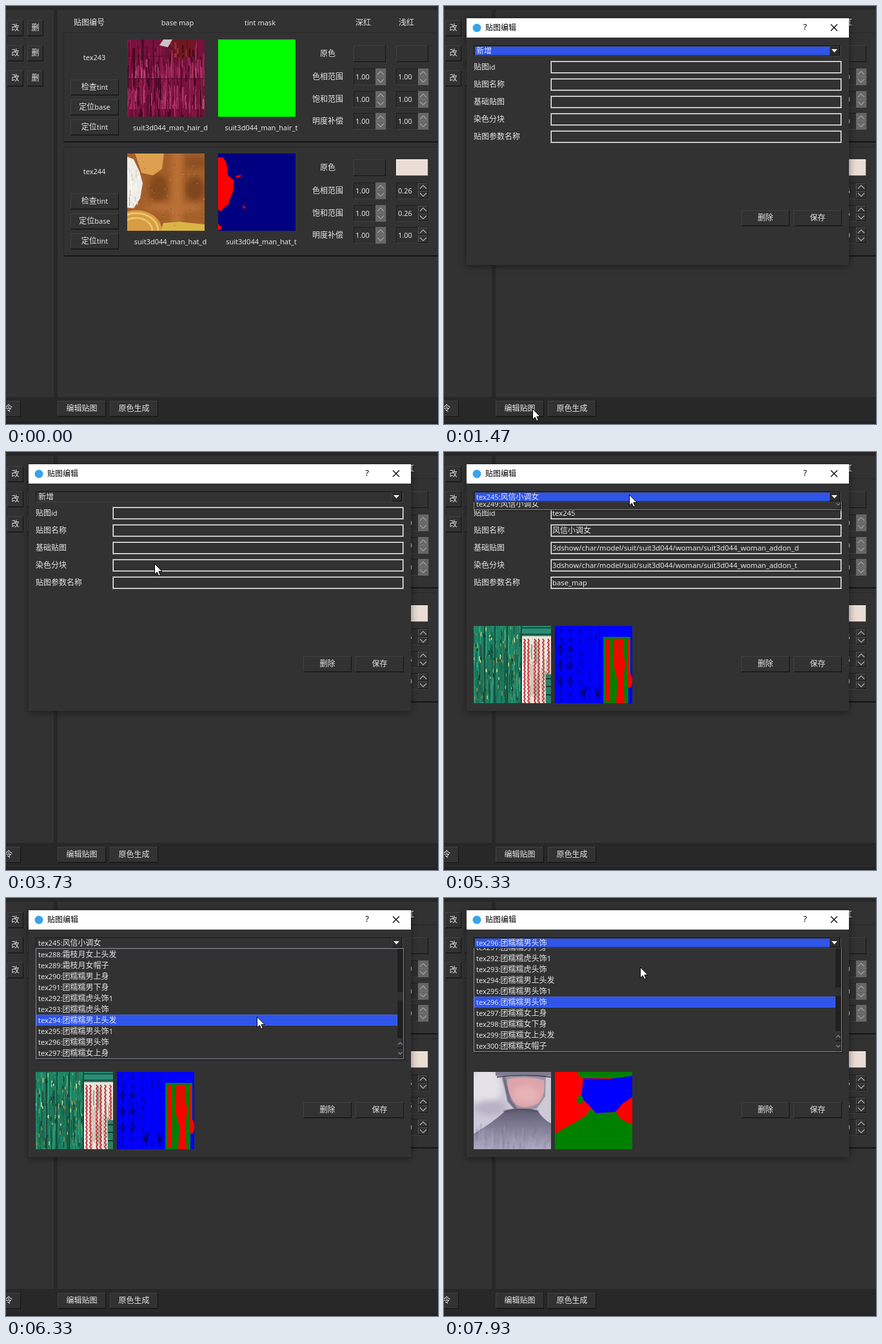
Recreate the animation shown at these times as an HTML page. Size 670x649 px, loop 8000 ms.

```html
<!DOCTYPE html>
<html lang="zh-CN">
<head>
<meta charset="utf-8">
<title>贴图编辑</title>
<style>
html, body { margin: 0; width: 100%; height: 100%; overflow: hidden; background: #282828; }
svg { display: block; }
#stage { position: absolute; left: 0; top: 0; }
text { font-family: "Noto Sans", "Noto Sans CJK SC", "Noto Sans CJK", sans-serif; white-space: pre; }
rect { shape-rendering: crispEdges; }
#dialog { transform-origin: 331px 210px; }
#frame { filter: drop-shadow(0 2px 6px rgba(0, 0, 0, .45)); }
</style>
</head>
<body>
<svg id="stage" width="670" height="649" viewBox="0 0 670 649">
  <defs>
    <clipPath id="below"><rect x="40" y="78" width="590" height="180"/></clipPath>
    <filter id="soft" x="-30%" y="-30%" width="160%" height="160%"><feGaussianBlur stdDeviation="4"/></filter>
    <filter id="slight"><feGaussianBlur stdDeviation="1"/></filter>
    <linearGradient id="fur" x2="0" y2="1"><stop stop-color="#5d596f"/><stop offset=".5" stop-color="#85819a"/><stop offset="1" stop-color="#aaa7bf"/></linearGradient>
  </defs>
  <g id="main"></g>
  <g id="dialog">
    <g id="chrome"></g>
    <g id="combo"></g>
    <g id="fields"></g>
    <g clip-path="url(#below)"><g id="popup"></g></g>
  </g>
  <path id="cursor" d="M0 0V16.5L3.8 13L6.3 18.8L8.8 17.7L6.4 12H11.6Z" fill="#fff" stroke="#000" stroke-width="1"/>
</svg>
<script>
const $ = id => document.getElementById(id);
const range = n => [...Array(n).keys()];
const LOOP = 8000, STEP = 1000 / 15;

let seed = 1;
const rnd = (a = 0, b = 1) => {
  seed = (seed * 16807) % 2147483647;
  return a + (b - a) * seed / 2147483647;
};
const pick = list => list[Math.floor(rnd(0, list.length))];

// ---- drawing helpers ----
const rect = (x, y, w, h, fill, extra = '') =>
  `<rect x="${x}" y="${y}" width="${w}" height="${h}" fill="${fill}" ${extra}/>`;
const shape = (d, fill, extra = '') => `<path d="${d}" fill="${fill}" ${extra}/>`;
const line = (d, stroke, width = 1, extra = '') =>
  `<path d="${d}" fill="none" stroke="${stroke}" stroke-width="${width}" ${extra}/>`;
const oval = (x, y, rx, ry, fill, extra = '') =>
  `<ellipse cx="${x}" cy="${y}" rx="${rx}" ry="${ry}" fill="${fill}" ${extra}/>`;

// y is the middle of the line; Latin runs are set slightly smaller than Han runs
function text(x, y, str, { anchor = 'start', fill = '#e6e6e6', latin = 11 } = {}) {
  const runs = str.match(/[\x00-\x7f]+|[^\x00-\x7f]+/g) || [];
  const spans = runs.map(r => `<tspan font-size="${r.charCodeAt(0) < 128 ? latin : 12}">${r}</tspan>`);
  return `<text x="${x}" y="${y + 4}" fill="${fill}" text-anchor="${anchor}">${spans.join('')}</text>`;
}
const centred = (x, y, str) => text(x, y, str, { anchor: 'middle' });

const bevel = (x, y, w, h, fill = '#323232', light = '#414141', dark = '#141414') =>
  rect(x, y, w, h, dark) + rect(x, y, w - 1, h - 1, light) + rect(x + 1, y + 1, w - 2, h - 2, fill);
const button = (x, y, w, label) =>
  bevel(x, y, w, 25) + rect(x + 1, y + 23, w - 2, 1, '#262626') + centred(x + w / 2, y + 12, label);

const chevron = (x, y, dir, color, size = 5) =>
  line(`M${x - size} ${y + dir * size / 2}L${x} ${y - dir * size / 2}L${x + size} ${y + dir * size / 2}`, color, 1.2);

function spin(x, y, value, enabled) {
  const parts = [bevel(x, y, 51, 26, '#2f2f2f', '#1e1e1e', '#404040'), text(x + 3, y + 13, value)];
  if (enabled) {
    parts.push(bevel(x + 34, y + 1, 16, 12, '#323232', '#555', '#161616'),
      bevel(x + 34, y + 13, 16, 12, '#323232', '#555', '#161616'));
  } else {
    parts.push(rect(x + 34, y, 16, 26, '#676767'), rect(x + 34, y + 12, 16, 1, '#747474'));
  }
  const color = enabled ? '#b5b5b5' : '#a2a2a2';
  parts.push(chevron(x + 42, y + 7, 1, color), chevron(x + 42, y + 19, -1, color));
  return parts.join('');
}

// ---- textures, each 120 x 120 ----
const tile = (x, y, body) => `<svg x="${x}" y="${y}" width="120" height="120">${body}</svg>`;

const strands = (n, colors, x0, x1, y0, y1, short, long, width = 1.5) => range(n).map(() => {
  const x = rnd(x0, x1), y = rnd(y0, y1), len = Math.min(rnd(short, long), y1 - y);
  return line(`M${x.toFixed(1)} ${y.toFixed(1)}q${rnd(-2, 2).toFixed(1)} ${(len / 2).toFixed(1)} 0 ${len.toFixed(1)}`,
    pick(colors), rnd(.5, width).toFixed(1));
}).join('');

// vertical zigzag
const zigzag = (x, y, n, dx, dy) => `M${x} ${y}` + range(n).map(i => `l${i % 2 ? -dx : dx} ${dy}`).join('');

function hair() {
  seed = 11;
  const deep = ['#4c0a27', '#8c1748', '#66102f', '#a0235a', '#360619'];
  const shine = ['#c94a80', '#b23468', '#a02a5c'];
  return rect(0, 0, 120, 120, '#76123b') + strands(190, deep, 0, 120, -10, 120, 18, 60, 3) +
    strands(80, shine, 0, 120, 30, 60, 10, 25) + strands(80, shine, 0, 120, 70, 108, 12, 32) +
    shape('M68 0H108L102 26L84 30L70 16Z', '#6f1821') + strands(16, ['#a33030', '#3f0c14'], 68, 104, 0, 28, 8, 18, 3) +
    shape('M56 0H70L63 12L50 9Z', '#c9c4c2') + line('M0 61H120M0 26H60', '#4c0a27', 2, 'opacity=".4"');
}

function hat() {
  seed = 5;
  const blur = 'filter="url(#soft)"';
  return rect(0, 0, 120, 120, '#a45f2b') +
    oval(48, 54, 15, 22, '#83481f', blur) + oval(105, 55, 15, 19, '#7f441e', blur) +
    oval(106, 14, 18, 10, '#8d4f22', blur) + oval(72, 84, 46, 7, '#b87034', blur) + rect(69, -10, 16, 125, '#ba7136', blur) +
    shape('M12 0H57L54 24L40 34L22 30Z', '#dca04e') +
    shape('M0 5L10 9L19 28L24 46L20 70L10 85L0 84Z', '#f0ece6') + strands(22, ['#bdb4aa', '#fff'], 0, 20, 10, 84, 5, 14) +
    oval(14, 120, 40, 32, '#d99c42') + [34, 25].map(r => line(`M${14 - r} 120A${r} ${r * .8} 0 0 1 ${14 + r} 120`, '#ecc56c', 3)).join('') +
    shape('M56 108L80 106L120 110V120H52Z', '#d9b545') +
    range(60).map(() => rect(rnd(25, 119).toFixed(0), rnd(2, 118).toFixed(0), 1, 1, pick(['#d9a25c', '#7d431c']))).join('');
}

const hatMask = () => rect(0, 0, 120, 120, '#000080') +
  shape('M0 6H8L13 15L15 34L25 42L23 60L18 71L16 79L9 84L4 90L0 87ZM27 35L36 33L34 37L28 37ZM37 79L43 84L40 86ZM0 109L6 115L3 119H0Z', '#f00');

function cloth() {
  seed = 23;
  return rect(0, 0, 120, 120, '#1f8463') +
    strands(150, ['#0f4c3d', '#2b9c76', '#146650', '#35a880', '#2a5a48', '#1b7458'], 0, 76, -10, 120, 12, 55, 2.4) +
    strands(90, ['#d8c46a', '#e9e2a4', '#b5883a', '#0b2e26'], 0, 74, 0, 120, 3, 8, 1.6) +
    line('M17 0V120M33 0V120M52 0V120M74 0V120', '#0e3f35', 1.5) +
    rect(75, 0, 45, 16, '#2a8e74') + line('M75 3H120M75 13H120', '#174e44', 2) +
    rect(75, 16, 45, 104, '#e9e5db') +
    strands(45, ['#b9aa98', '#98a88f', '#fff', '#c9b6a8'], 76, 119, 18, 120, 20, 60, 2.4) +
    [78, 84, 94, 100, 107, 115].map(x => line(zigzag(x, 20, 34, 2, 3), '#c22a35', 1.8)).join('') +
    rect(112, 75, 8, 45, '#2b8062') + line('M112 82H120M112 94H120M112 107H120', '#123f35', 2);
}

function clothMask() {
  seed = 31;
  const ticks = range(5).map(i => line(`M${9 + i * 15} 4V118`, '#000050', 1, `stroke-dasharray="${7 + i} ${5 + i % 3}"`)).join('');
  const crosses = range(6).map(i => {
    const x = 9 + i % 2 * 15, y = 36 + (i >> 1) * 25;
    return line(`M${x} ${y - 6}V${y + 6}M${x - 5} ${y}l5 -4 5 4 -5 4Z`, '#000050');
  }).join('');
  return rect(0, 0, 120, 120, '#00f') + ticks + crosses + strands(25, ['#000060', '#0000a0'], 2, 72, 5, 118, 4, 12, 1.2) +
    line('M41 95l4 16 4 -16M62 95l4 16 4 -16M45 92V115M66 92V115', '#000050', 1.5) +
    rect(75, 17, 42, 103, '#008000') + line(zigzag(81, 21, 32, 2, 3), '#f00', 5) +
    shape('M92 20H107L105 36L109 58L106 86L108 120H95L97 86L91 62Z', '#f00') +
    line('M100 24V56', '#008000', 1.5) + rect(112, 20, 4, 70, '#f00') + oval(116, 85, 4, 11, '#f00') + rect(114, 96, 6, 24, '#00f');
}

function furHead() {
  seed = 47;
  return rect(0, 0, 120, 120, '#cdc9d7') +
    oval(18, 24, 25, 30, '#e4e1e8', 'filter="url(#soft)"') + oval(26, 56, 25, 12, '#b8b3c6', 'filter="url(#soft)"') +
    shape('M46 8L112 6L111 38L98 57L66 60L52 46Z', '#9a94a4') + line('M46 8L56 45L66 58', '#6a6578', 4, 'filter="url(#slight)"') +
    shape('M52 11Q82 5 109 13Q112 34 101 48Q82 59 66 51Q52 36 52 11Z', '#dda4ab') +
    oval(82, 35, 20, 14, '#e6b3b5', 'filter="url(#soft)"') +
    rect(34, 0, 86, 6, '#817c8f') + line('M36 8Q80 3 120 8', '#4f4a5b', 2) +
    shape('M0 96Q28 80 50 60Q76 54 99 60Q108 74 120 80V120H0Z', 'url(#fur)') +
    `<g opacity=".45" filter="url(#slight)">${strands(70, ['#6f6b84', '#b8b5ca'], 4, 118, 80, 120, 10, 30, 2)}</g>` +
    line('M47 62Q75 54 100 62', '#544f63', 3, 'filter="url(#slight)"');
}

const furMask = () => rect(0, 0, 120, 120, '#f00') +
  shape('M36 0H120V6L102 10L45 9L37 7ZM0 96L10 90L30 79L48 68L55 57L64 64L94 62L102 73L120 82V120H0Z', '#008000') +
  shape('M44 10L85 11L120 6V39L105 49L94 62L64 64L53 52L41 40Z', '#00f') + oval(39, 43, 5, 6, '#008000');

// ---- main window ----
const lightSwatch = (x, y) => bevel(x, y, 50, 26, '#ebdcd5', '#fbf6f3', '#55504d');

function group(top, name, part, swatch, values) {
  const rows = ['色相范围', '饱和范围', '明度补偿'];
  return rect(89, top, 581, 171, '#272727') + rect(90, top + 1, 580, 169, '#323232') + rect(89, top + 169, 581, 2, '#151515') +
    centred(137, top + 39, name) +
    ['检查tint', '定位base', '定位tint'].map((s, i) => button(100, top + 73 + i * 31, 75, s)).join('') +
    centred(255, top + 148, `suit3d044_man_${part}_d`) + centred(396, top + 148, `suit3d044_man_${part}_t`) +
    centred(499, top + 33, '原色') + bevel(539, top + 20, 50, 26) + swatch(605, top + 20) +
    rows.map((s, i) => {
      const y = top + 56 + Math.round(i * 34.6);
      return centred(499, y + 13, s) + spin(539, y, '1.00', false) + spin(605, y, values ? values[i] : '1.00', !!values);
    }).join('');
}

$('main').innerHTML = rect(0, 0, 670, 649, '#282828') + rect(0, 6, 74, 601, '#323232') + rect(80, 6, 590, 601, '#323232') +
  rect(0, 645, 670, 4, '#222') +
  [22, 61, 100].map(y => button(2, y, 25, '改') + button(33, y, 25, '删')).join('') +
  text(105, 26, '贴图编号') + centred(266, 26, 'base map') + centred(394, 26, 'tint mask') +
  centred(554, 26, '深红') + centred(621, 26, '浅红') +
  group(41, 'tex243', 'hair', (x, y) => bevel(x, y, 50, 26)) + group(218, 'tex244', 'hat', lightSwatch, ['0.26', '0.26', '1.00']) +
  tile(188, 52, hair()) + tile(329, 52, rect(0, 0, 120, 120, '#0f0')) + tile(188, 229, hat()) + tile(329, 229, hatMask()) +
  bevel(-53, 613, 76, 25) + text(10, 625, '生成指令', { anchor: 'end' }) +
  button(80, 613, 75, '编辑贴图') + button(161, 613, 75, '原色生成');

// ---- dialog ----
const fieldY = i => 95 + i * 27;
const input = y => rect(165, y, 452, 20, '#8c8c8c') + bevel(166, y + 1, 450, 18, '#323232', '#f8f8f8', '#f8f8f8');

$('chrome').innerHTML = `<g id="frame">${rect(35, 19, 593, 383, '#323232')}</g>` + rect(35, 19, 593, 30, '#fff') +
  oval(51, 34, 6.5, 6.5, '#38a3ea') + text(64, 34, '贴图编辑', { fill: '#000' }) +
  text(560, 33, '?', { anchor: 'middle', fill: '#000', latin: 13 }) + line('M600 28.5L610 38.5M610 28.5L600 38.5', '#000', 1.2) +
  ['贴图id', '贴图名称', '基础贴图', '染色分块', '贴图参数名称'].map((s, i) =>
    text(46, fieldY(i), s) + input(fieldY(i) - 10)).join('') +
  button(461, 317, 75, '删除') + button(542, 317, 75, '保存');

// ---- list entries ----
const NEAR = ['男上身', '男下身', '虎头饰1', '虎头饰', '男上头发', '男头饰1', '男头饰', '女上身', '女下身', '女上头发', '女帽子'];
const PARTS = ['上身', '下身', '上头发', '帽子'];
function entryName(n) {
  if (n < 250) return '风信小调' + (n < 245 ? '男' : '女');
  if (n < 290) return '霜枝月' + ((n >> 2) % 2 ? '男' : '女') + PARTS[(n + 2) % 4];
  return '团糯糯' + NEAR[Math.min(n - 290, NEAR.length - 1)];
}
const entry = i => i ? `tex${240 + i}:${entryName(240 + i)}` : '新增';

const path = (suit, who, kind) => `3dshow/char/model/suit/${suit}/${who}/${suit}_${who}_addon_${kind}`;
function details(i, suit, who, base, mask) {
  const values = [`tex${240 + i}`, entryName(240 + i), path(suit, who, 'd'), path(suit, who, 't'), 'base_map'];
  return values.map((s, k) => text(168, fieldY(k), s, { latin: 11.3 })).join('') + tile(46, 270, base) + tile(172, 270, mask);
}
const DETAILS = {
  0: '',
  5: details(5, 'suit3d044', 'woman', cloth(), clothMask()),
  56: details(56, 'suit3d051', 'man', furHead(), furMask())
};

const BLUE = '#2f55ea';
const drawCombo = (selected, focus) => bevel(46, 61, 570, 17, '#323232', '#191919', '#444') +
  (focus ? rect(48, 63, 550, 13, BLUE) : '') + text(50, 70, entry(selected)) +
  bevel(598, 62, 16, 15, '#2c2c2c', '#3c3c3c', '#111') + shape('M601 67H610L605.5 72Z', '#fff');

const rowTop = row => 81 + row * 17 - 0;
const drawPopup = (first, row) => rect(48, 80, 571, 172, '#000', 'opacity=".3"') +
  bevel(46, 78, 571, 172, '#323232', '#858994', '#858994') +
  (row >= 0 && row < 10 ? rect(47, 79 + row * 17, 560, 17, BLUE) +
    rect(47.5, 79.5 + row * 17, 559, 16, 'none', 'stroke="#5a78ee" stroke-dasharray="1 1"') : '') +
  range(10).map(i => text(50, 88 + i * 17, entry(first + i))).join('') +
  rect(607, 79, 9, 170, '#202020') + rect(607, 79 + Math.round(first * 1.4), 9, 13, '#303030') +
  [218, 234].map(y => bevel(607, y, 9, 15, '#323232', '#3c3c3c', '#1a1a1a')).join('') +
  chevron(611.5, 226, 1, '#8a8a8a', 3) + chevron(611.5, 241, -1, '#8a8a8a', 3);

// ---- motion ----
const POINTER = [
  [130, 656, 556], [270, 520, 590], [400, 350, 624], [530, 225, 634], [670, 158, 629], [800, 137, 625], [1540, 137, 625],
  [1670, 143, 560], [1800, 165, 330], [1930, 189, 130], [2000, 195, 75], [2270, 204, 34], [2530, 220, 67], [3135, 220, 67],
  [3270, 223, 100], [3400, 229, 157], [3470, 230, 173], [4670, 230, 173], [4870, 243, 145], [5130, 277, 85], [5330, 287, 66],
  [5400, 293, 70], [5470, 318, 92], [5530, 350, 130], [5630, 387, 180], [6130, 389, 191], [6200, 389, 191],
  [6330, 389, 184], [6600, 388, 174], [7140, 388, 174], [7330, 365, 140], [7530, 320, 80], [7670, 304, 67], [7800, 304, 69], [7933, 304, 107]
];
function pointerAt(t) {
  const k = POINTER.findIndex(p => p[0] > t);
  if (k < 0) return POINTER[POINTER.length - 1].slice(1);
  if (k === 0) return POINTER[0].slice(1);
  const [t0, x0, y0] = POINTER[k - 1], [t1, x1, y1] = POINTER[k];
  const u = (t - t0) / (t1 - t0);
  return [x0 + (x1 - x0) * u, y0 + (y1 - y0) * u];
}

const POPUPS = [
  { from: 2817, to: 3720, applied: 4190 },
  { from: 5323, to: 6790, applied: 7190 },
  { from: 7793, to: 9000, applied: 9000 }
];
const SLIDE = 150, HEIGHT = 172;
function firstRow(t) {
  if (t < 5530) return 0;
  return t < 6390 ? Math.min(48, 6 * Math.floor((t - 5530) / STEP)) : 51;
}

const cache = {};
function update(id, key, draw) {
  if (cache[id] === key) return;
  cache[id] = key;
  $(id).innerHTML = draw();
}

function render(now) {
  const t = Math.min(119, Math.floor((now % LOOP + 5) / STEP)) * STEP;
  const [x, y] = pointerAt(t).map(Math.round);
  $('cursor').setAttribute('transform', `translate(${x + .5} ${y + .5})`);
  $('cursor').style.display = t < 130 ? 'none' : '';

  const grow = Math.min(1, (t - 1140) / 300), ease = 1 - (1 - grow) ** 2;
  $('dialog').style.display = grow > 0 ? '' : 'none';
  $('dialog').style.opacity = ease;
  $('dialog').style.transform = grow < 1 ? `scale(${.92 + .08 * ease})` : 'none';

  const selected = t < 4190 ? 0 : t < 7190 ? 5 : 56;
  const focus = !POPUPS.some(p => t >= p.from + SLIDE && t < p.applied);
  update('combo', `${selected} ${focus}`, () => drawCombo(selected, focus));
  update('fields', selected, () => DETAILS[selected]);

  const open = POPUPS.find(p => t >= p.from && t < p.to);
  $('popup').style.display = open ? '' : 'none';
  if (open) {
    const shown = Math.min(1, (t - open.from) / SLIDE), first = firstRow(t);
    const row = shown === 1 && y >= 79 ? Math.floor((y - 79) / 17) : selected - first;
    update('popup', `${first} ${row}`, () => drawPopup(first, row));
    $('popup').setAttribute('transform', `translate(0 ${Math.round((shown - 1) * HEIGHT)})`);
  }
}

const start = performance.now();
(function tick() {
  render(performance.now() - start);
  requestAnimationFrame(tick);
})();
</script>
</body>
</html>
```
